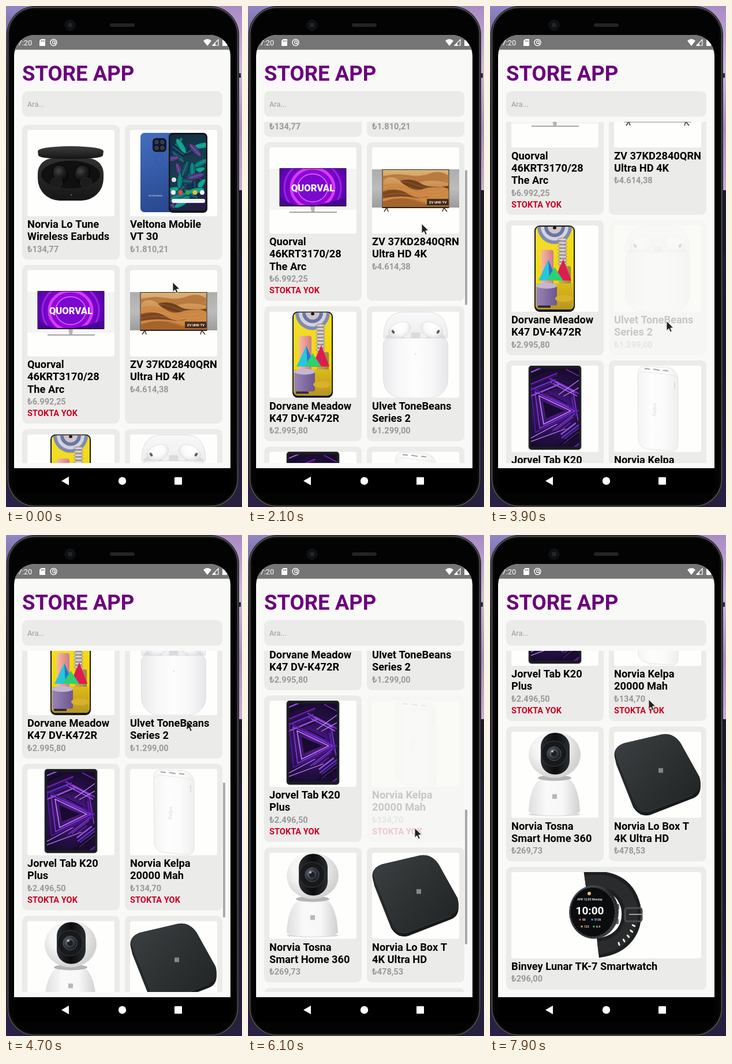
Animation, 409 px wide and 865 px high, one loop 8 s. Source, as an HTML page with a canvas:

```html
<!DOCTYPE html>
<html lang="tr">
<head>
<meta charset="utf-8">
<title>Store App</title>
<style>
html, body { margin: 0; width: 100%; height: 100%; overflow: hidden; background: #000; }
canvas { display: block; width: 409px; height: 865px; }
</style>
</head>
<body>
<canvas id="stage" width="409" height="865"></canvas>
<script>
const ctx = document.getElementById('stage').getContext('2d');
const LOOP = 8000, STEP = 100;
const PAGE = '#f9f9f7', CARD = '#ebebea', TAU = Math.PI * 2;
const FONT = 'Roboto, "Open Sans", sans-serif';
const VIEW = { top: 200, bottom: 789, content: 1493.5 };

// Motion: rows of [time, value, ...]
const SCROLL = [[1500, 0], [1600, 14], [1800, 85], [2100, 212], [2300, 262], [2500, 300], [2700, 330],
  [2900, 348.5], [3100, 357], [3300, 360.5], [3900, 360.5], [4000, 372], [4300, 450], [4700, 577.5],
  [4900, 642], [5100, 677], [6000, 677], [6100, 695.5], [6500, 818], [6700, 876], [6900, 904.5]];
const POINTER = [[100, 289, 477], [200, 266, 516], [300, 242, 557], [400, 242, 557], [800, 284, 601],
  [1500, 284, 601], [1600, 286, 577], [1800, 293, 503], [2100, 301, 376], [2500, 304, 290], [2900, 305, 249],
  [3400, 305, 249], [3800, 306, 544], [3900, 306, 544], [4300, 310, 445], [4700, 313, 320], [5100, 318, 243],
  [5200, 318, 243], [5700, 293, 308], [5800, 293, 308], [5900, 290, 517], [6000, 290, 517], [6100, 289, 506],
  [6500, 297, 384], [6900, 304, 240], [7200, 300, 225], [7700, 300, 225], [7900, 275, 284]];
const BAR = [[1500, 0], [1600, 1], [3400, 1], [3700, 0], [3900, 0], [4000, 1], [5200, 1], [5500, 0],
  [6000, 0], [6100, 1], [7000, 1], [7300, 0]];

function track(rows, t, col = 1) {
  if (t <= rows[0][0]) return rows[0][col];
  for (let i = 1; i < rows.length; i++) {
    const a = rows[i - 1], b = rows[i];
    if (t <= b[0]) return a[col] + (b[col] - a[col]) * (t - a[0]) / (b[0] - a[0]);
  }
  return rows[rows.length - 1][col];
}

function seeded(seed) {
  return () => (seed = (seed * 16807) % 2147483647) / 2147483647;
}

function grad(x0, y0, x1, y1, ...colors) {
  const g = ctx.createLinearGradient(x0, y0, x1, y1);
  colors.forEach((c, i) => g.addColorStop(i / (colors.length - 1), c));
  return g;
}
function glow(x, y, r, ...colors) {
  const g = ctx.createRadialGradient(x, y, 0, x, y, r);
  colors.forEach((c, i) => g.addColorStop(i / (colors.length - 1), c));
  return g;
}
function paint(fill, stroke, width = 1) {
  if (fill) { ctx.fillStyle = fill; ctx.fill(); }
  if (stroke) { ctx.strokeStyle = stroke; ctx.lineWidth = width; ctx.stroke(); }
}
function box(x, y, w, h, r, fill, stroke, width) {
  ctx.beginPath();
  ctx.roundRect(x, y, w, h, r);
  paint(fill, stroke, width);
}
function oval(x, y, rx, ry, fill, stroke, width, turn = 0) {
  ctx.beginPath();
  ctx.ellipse(x, y, rx, ry, turn, 0, TAU);
  paint(fill, stroke, width);
}
function poly(points, fill, stroke, width) {
  ctx.beginPath();
  points.forEach(([x, y], i) => i ? ctx.lineTo(x, y) : ctx.moveTo(x, y));
  ctx.closePath();
  paint(fill, stroke, width);
}
function path(d, fill, stroke, width = 1) {
  const p = new Path2D(d);
  if (fill) { ctx.fillStyle = fill; ctx.fill(p); }
  if (stroke) { ctx.strokeStyle = stroke; ctx.lineWidth = width; ctx.stroke(p); }
}
function text(s, x, y, size, color, weight = 'bold', align = 'left') {
  ctx.font = `${weight} ${size}px ${FONT}`;
  ctx.fillStyle = color;
  ctx.textAlign = align;
  ctx.fillText(s, x, y);
}
function clipped(x, y, w, h, r, draw) {
  ctx.save();
  ctx.beginPath();
  ctx.roundRect(x, y, w, h, r);
  ctx.clip();
  draw();
  ctx.restore();
}

// Product pictures, drawn in a 151 x 149 box
function earbuds() {
  box(18, 49, 114, 73, [26, 26, 38, 38], grad(0, 49, 0, 122, '#303030', '#242424', '#161616'));
  oval(75, 77, 51, 24, '#101010');
  for (const [x, lean] of [[57, -0.3], [95, 0.3]]) {
    oval(x, 76, 13, 16, glow(x - 3, 71, 17, '#444', '#222', '#0c0c0c'), '#000', 1, lean);
    oval(x + lean * 22, 91, 10, 9, '#1c1c1c', '#333', 0.7);
  }
  oval(76, 112, 1.2, 1, '#777');
  path('M18 37Q18 29 75 28Q132 29 132 37L131 44Q128 50 75 50Q22 50 19 44Z',
    grad(0, 28, 0, 50, '#3c3c3c', '#2a2a2a', '#141414'));
}

function bluePhone() {
  box(18, 5, 62, 137, 7, grad(18, 0, 72, 140, '#446fbe', '#365ba9', '#29468b'));
  box(39, 14, 24, 24, 6, '#15182a');
  [[46, 21], [56, 21], [46, 31], [56, 31]].forEach(([x, y]) => oval(x, y, 3, 3, '#303747', '#53607c', 0.7));
  oval(51, 51, 7, 8, null, '#30529d');
  text('VELTONA MOBILE', 44, 115, 3, '#a5b8dd', 'bold', 'center');
  box(67, 5, 67, 138, 7, '#12151c');
  clipped(69.5, 8, 62, 131, 5, () => {
    ctx.fillStyle = grad(68, 0, 134, 130, '#112c3d', '#183e50', '#251c45');
    ctx.fillRect(67, 5, 67, 138);
    const rnd = seeded(91);
    for (let i = 0; i < 32; i++) {
      const x = 70 + rnd() * 62, y = 18 + rnd() * 110, a = rnd() * 3;
      oval(x, y, 15, 5, ['#087b78', '#0fa08e', '#154e62', '#5b3685', '#14314d'][i % 5], '#0c2535', 0.7, a);
      ctx.save();
      ctx.translate(x, y); ctx.rotate(a);
      ctx.fillStyle = '#44b1a0'; ctx.fillRect(-12, 0, 24, 0.6);
      ctx.restore();
    }
    ['#f5f5f5', '#e84b3c', '#2dac58', '#f3ba2a', '#f5f5f5'].forEach((c, i) => oval(75 + i * 12.5, 108, 4, 4, c));
    box(72, 119, 58, 7, 3, '#f5f5f5');
    oval(76, 86, 4, 4, '#d5e4e3');
  });
}

function ringsTv() {
  ctx.fillStyle = '#f4f5f2'; ctx.fillRect(0, 37, 151, 71);
  box(17.5, 36, 116, 66, 1, '#2a1238');
  clipped(18.5, 37, 114, 63, 0, () => {
    ctx.fillStyle = glow(75, 70, 66, '#b412ee', '#a30ce6', '#8806d8', '#6a04bd', '#4f039c');
    ctx.fillRect(18, 36, 116, 66);
    oval(75, 70, 37, 34, null, '#d63cf5', 5);
    oval(75, 70, 26, 24, '#7a08cf', '#e36bf7', 1.5);
    oval(75, 70, 49, 46, null, '#9a23e8', 3);
    path('M18 86Q46 106 75 101T134 86V104H18Z', '#4a0494');
  });
  text('QUORVAL', 75.5, 76, 16.6, '#fff', 900, 'center');
  poly([[71, 102], [79, 102], [78, 111], [73, 111]], '#b3b3b3');
  ctx.fillStyle = '#a2a2a2'; ctx.fillRect(35, 111, 82, 2);
}

function dunesTv() {
  ctx.fillStyle = grad(0, 38, 0, 104, '#adadad', '#bcbcbc', '#9c9c9c');
  ctx.fillRect(0, 38, 151, 66);
  ctx.fillStyle = '#292321'; ctx.fillRect(17.5, 38, 116, 67);
  clipped(18.5, 39, 114, 64, 0, () => {
    ctx.fillStyle = grad(0, 39, 0, 103, '#dcb277', '#c98a49', '#96592a');
    ctx.fillRect(18, 38, 116, 66);
    path('M18 50Q42 44 62 48T100 45T134 50V62Q104 54 84 60T46 56T18 60Z', '#b87a3f');
    path('M48 58Q70 52 84 62T134 66V72Q106 66 88 72T48 58Z', '#6f3f1c');
    path('M18 66Q44 58 64 70T106 72T134 78V104H18Z', '#cc8744');
    path('M18 76Q42 68 62 80T100 84L80 88Q52 82 18 88Z', '#7c4620');
    path('M18 94Q52 82 82 93T134 90V104H18Z', '#a5642d');
    for (let i = 0; i < 6; i++)
      path(`M18 ${56 + i * 7}Q48 ${46 + i * 7} 76 ${58 + i * 7}T134 ${55 + i * 7}`, null, '#e4a75d77', 0.7);
    ctx.fillStyle = '#28190fcc'; ctx.fillRect(95, 89, 38, 11);
  });
  text('ZV UHD TV', 114, 97, 6, '#fff', 'bold', 'center');
  path('M25 105L21 111M26 105L28 111M125 105L130 111M124 105L122 111', null, '#292929', 1.4);
}

function yellowPhone() {
  box(40, 0, 70, 149, 9, '#17181c');
  clipped(42, 2, 66, 143, 7, () => {
    ctx.fillStyle = grad(42, 0, 108, 145, '#f2df37', '#f3d90f', '#ecc90c');
    ctx.fillRect(40, 0, 70, 149);
    [[30, '#7f8bb0'], [24, '#d3d3dc'], [18, '#6a75a3'], [12, '#d0c4cc']].forEach(([r, c]) => oval(75, 2, r, r, c));
    box(83, 21, 12, 50, 2, '#a89e9c');
    for (let i = 0; i < 8; i++) oval(88.5, 24 + i * 6, 8, 2.2, '#ddd3d2', '#857a85', 0.8);
    box(51, 42, 22, 64, 4, grad(51, 0, 73, 0, '#f4bda0', '#ea9a92', '#cc7c8e'));
    box(82, 70, 21, 40, 3, grad(82, 0, 103, 0, '#c9b44a', '#98834a'));
    box(43, 100, 64, 46, 0, grad(0, 100, 0, 146, '#dcbc15', '#b69424'));
    box(43, 104, 36, 34, 3, grad(43, 0, 79, 0, '#9985b4', '#6c5790'));
    oval(61, 104, 18, 5, '#c6b6d2');
    oval(91, 126, 15, 6, '#d8b22a');
    poly([[64, 59], [47, 95], [78, 95]], '#28c6dd');
    poly([[64, 59], [66, 95], [79, 95]], '#2477c4');
    poly([[90, 58], [74, 95], [104, 95]], '#dd1c50');
    poly([[75, 72], [61, 95], [90, 95]], '#2fd070');
    box(46, 138, 22, 4, 1, '#342c3c');
  });
  oval(75, 4, 3, 2.5, '#111');
}

function budsCase() {
  path('M20 45Q20 3 52 1H99Q131 3 131 45Q119 53 75 52Q32 53 20 45Z',
    grad(0, 0, 0, 50, '#f9f9fa', '#ececee'), '#dcdcdf');
  oval(75.5, 44, 52, 8, '#dadbde');
  for (const side of [-1, 1]) {
    const x = 75.5 + side * 28;
    box(x - side * 14 - 6, 26, 12, 26, 5, '#f0f0f1');
    oval(x, 32, 20, 13, glow(x, 26, 24, '#fff', '#fafafa', '#dadbdd'), '#d3d4d6', 0.7, side * 0.45);
    oval(x + side * 11, 35, 2.2, 3.5, '#5d6165', null, 1, side * 0.6);
  }
  box(19.5, 46, 112, 103, [10, 10, 31, 31],
    grad(19, 0, 132, 0, '#e9e9eb', '#f8f8f9', '#fdfdfd', '#f7f7f8', '#e6e6e9'), '#dfdfe1');
  oval(75.5, 73, 1.5, 1.5, '#dfe2de');
}

function tablet() {
  box(30, 0, 91, 145, 5, '#1b1b22', '#4b4b52', 0.7);
  clipped(34, 5, 83, 135, 1, () => {
    ctx.fillStyle = glow(73, 75, 76, '#55218e', '#2b1152', '#150a28');
    ctx.fillRect(30, 0, 91, 145);
    const rnd = seeded(27);
    for (let i = 0; i < 46; i++) {
      const a = [0.48, -0.65, 1.4, 2.75][i % 4], d = 16 + rnd() * 66, len = 14 + rnd() * 48;
      ctx.save();
      ctx.translate(73, 75); ctx.rotate(a);
      ctx.fillStyle = ['#6530c4', '#9a52dd', '#441485', '#7a25bb', '#110b20'][i % 5];
      ctx.fillRect(-len / 2, d * (i % 2 ? 1 : -1), len, 0.7 + rnd() * 2);
      ctx.restore();
    }
    [0, 7, 14].forEach(k => poly([[48 - k, 52 - k], [103 + k, 78], [56 - k, 101 + k]],
      null, ['#c77aff', '#8a36e3', '#531ba5'][k / 7], 1.6));
    poly([[55, 62], [92, 78], [60, 91]], '#190a31');
    path('M34 125L79 101M34 131L94 109M82 50L117 25M90 53L117 38', null, '#c886ff', 1.3);
  });
}

function powerBank() {
  path('M41 14Q41 2 52 1L92 3Q100 4 105 9L109 15Q111 18 111 24V136Q111 148 99 148L58 144Q46 142 42 130Z',
    grad(41, 0, 111, 0, '#f4f4f3', '#fdfdfd', '#fbfbfb', '#efefee'), '#e3e3e2');
  path('M42 15Q46 10 56 11L98 16Q106 17 110 22', null, '#e8e8e7');
  path('M53 5L62 6M68 6L79 8M85 8L94 9', null, '#a5a5a5', 2);
  path('M105 28V40', null, '#dcdcdc', 2);
  ctx.save();
  ctx.translate(73, 87); ctx.rotate(-Math.PI / 2);
  text('Kelpa', 0, 0, 9, '#dededc', 'normal');
  ctx.restore();
}

function camera() {
  oval(75, 143, 45, 3, '#d8d8d8');
  path('M30 137Q32 99 47 84Q75 74 103 84Q117 99 119 137Q117 145 75 145Q32 145 30 137Z',
    grad(30, 0, 119, 0, '#dedede', '#f9f9f9', '#f7f7f7', '#d0d0d0'));
  oval(75, 80, 29, 5, '#b4b4b4');
  oval(75, 40, 45, 40, glow(66, 28, 53, '#fff', '#f4f4f4', '#d2d2d2'));
  box(51, 2, 50, 72, 24, grad(51, 0, 101, 0, '#2a2c2f', '#0a0b0c', '#2b2e31'));
  oval(74, 38, 22, 22, '#17191b', '#3a3d41', 1);
  oval(74, 38, 12, 12, glow(72, 36, 13, '#8a949c', '#434c53', '#1a1d20'), '#5d6369');
  oval(74, 38, 5, 5, '#1b2024');
  oval(71, 34, 2, 2, '#b8c0c8');
  box(71, 108, 8, 8, 0, '#b6b6b6');
}

function tvBox() {
  path('M1 44Q-2 27 17 20L82 5Q103 1 116 21L148 80Q155 108 137 115L62 144Q44 148 33 130L4 57Z', '#17191a');
  path('M2 40Q0 26 18 20L82 5Q103 1 116 21L148 78Q155 100 137 108L62 137Q44 141 35 124L5 50Z',
    grad(10, 15, 140, 125, '#3b3e40', '#2e3132', '#222526'));
  path('M3 49L33 125Q42 141 60 138L137 109', null, '#404345');
  box(77, 63, 8, 8, 0, '#84888a');
}

function watch() {
  const band = 'M128 17C170 11 198 24 207 60C213 96 194 126 150 131';
  path(band, null, '#1d1e1f', 34);
  path(band, null, '#2a2b2c', 22);
  // Strap holes follow the lower bend
  for (let i = 0; i < 5; i++) {
    const a = 0.28 + i * 0.2;
    oval(162 + 52 * Math.cos(a), 78 + 52 * Math.sin(a), 3.6, 1.6, '#e9e9e7', null, 1, a + 0.2);
  }
  box(197, 62, 29, 23, 4, null, '#4a4d4f', 3);
  path('M204 73H227', null, '#9fa1a3', 2);
  box(182, 55, 5, 10, 2, '#656769');
  box(181, 80, 5, 10, 2, '#656769');
  oval(143, 69, 43, 46, grad(100, 24, 186, 115, '#636669', '#222426', '#48494b'));
  oval(141, 69, 39, 43, '#0b0c0d', '#313437', 1.5);
  for (let i = 0; i < 48; i++) {
    const a = i / 48 * TAU;
    ctx.beginPath();
    ctx.moveTo(141 + 38 * Math.cos(a), 69 + 42 * Math.sin(a));
    ctx.lineTo(141 + 40 * Math.cos(a), 69 + 44 * Math.sin(a));
    paint(null, '#777', 0.6);
  }
  oval(135, 37, 3, 3, '#e4bf6d');
  text('APR 12/05 Monday', 136, 49, 5, '#ddd', 'bold', 'center');
  text('10:00', 136, 73, 19, '#fff', 'bold', 'center');
  [['#e34b3f', 119, 82], ['#3da4d8', 140, 82], ['#e49c39', 122, 94], ['#3bb864', 143, 94]].forEach(([c, x, y], i) => {
    oval(x, y, 1.8, 1.8, c);
    text(['80', '5136', '123', '6.4'][i], x + 4, y + 2, 5, '#ddd');
  });
}

const products = [
  { row: 0, side: 0, name: ['Norvia Lo Tune', 'Wireless Earbuds'], price: '134,77', art: earbuds },
  { row: 0, side: 1, name: ['Veltona Mobile', 'VT 30'], price: '1.810,21', art: bluePhone },
  { row: 1, side: 0, name: ['Quorval', '46KRT3170/28', 'The Arc'], price: '6.992,25', art: ringsTv, out: true },
  { row: 1, side: 1, name: ['ZV 37KD2840QRN', 'Ultra HD 4K'], price: '4.614,38', art: dunesTv,
    press: [[1200, 0], [1300, 0.5], [1400, 0.8], [1600, 0.8], [1800, 0]] },
  { row: 2, side: 0, name: ['Dorvane Meadow', 'K47 DV-K472R'], price: '2.995,80', art: yellowPhone },
  { row: 2, side: 1, name: ['Ulvet ToneBeans', 'Series 2'], price: '1.299,00', art: budsCase,
    press: [[3700, 0], [3800, 0.5], [3900, 0.8], [4000, 0.8], [4200, 0]] },
  { row: 3, side: 0, name: ['Jorvel Tab K20', 'Plus'], price: '2.496,50', art: tablet, out: true },
  { row: 3, side: 1, name: ['Norvia Kelpa', '20000 Mah'], price: '134,70', art: powerBank, out: true,
    press: [[6000, 0], [6100, 0.8], [6200, 0.8], [6400, 0]] },
  { row: 4, side: 0, name: ['Norvia Tosna', 'Smart Home 360'], price: '269,73', art: camera },
  { row: 4, side: 1, name: ['Norvia Lo Box T', '4K Ultra HD'], price: '478,53', art: tvBox },
  { row: 5, side: 0, wide: true, name: ['Binvey Lunar TK-7 Smartwatch'], price: '296,00', art: watch }
];
const rowTop = [205, 447, 730.5, 972.5, 1235, 1477.5];
const rowHeight = [233, 274, 233, 253, 233, 212];

function drawCard(p, t, scroll) {
  const y = rowTop[p.row] - scroll, h = rowHeight[p.row];
  if (y > VIEW.bottom || y + h < VIEW.top) return;
  const x = p.side ? 206 : 28, w = p.wide ? 347 : 169;
  box(x, y, w, h, 9, CARD);
  clipped(x + 9, y + 9, w - 18, 149, 4, () => {
    ctx.translate(x + 9, y + 9);
    ctx.fillStyle = '#fefefd'; ctx.fillRect(0, 0, w, 149);
    p.art();
  });
  p.name.forEach((line, i) => text(line, x + 9, y + 178 + i * 21.4, 18.25, '#000'));
  const base = y + 177 + p.name.length * 21.4;
  text('₺' + p.price, x + 9, base, 14.6, '#999');
  if (p.out) text('STOKTA YOK', x + 9, base + 20, 14.6, '#cb0020');
  const veil = p.press ? track(p.press, t) : 0;
  if (veil) {
    ctx.globalAlpha = veil;
    box(x - 0.5, y - 0.5, w + 1, h + 1, 9, PAGE);
    ctx.globalAlpha = 1;
  }
}

function drawDevice() {
  ctx.fillStyle = grad(0, 0, 0, 865, '#9387c4', '#2c2740', '#211e30', '#1d1a2b', '#211c38', '#2b2148');
  ctx.fillRect(0, 0, 205, 865);
  ctx.fillStyle = grad(0, 0, 0, 318, '#a98bc4', '#cdb8d8', '#a78fb8', '#c8abd0');
  ctx.fillRect(205, 0, 204, 318);
  ctx.fillStyle = grad(0, 318, 0, 865, '#211d3a', '#1b1930', '#272040');
  ctx.fillRect(205, 318, 204, 547);
  box(404, 116, 3, 8, 1, '#24222b');
  box(403, 318, 4, 108, 1, '#191820');
  box(1, 0, 403, 866, 50, '#262627');
  box(3.5, 2.5, 398, 861, 47, '#0c0c0c', '#58585a', 1.4);
  box(7, 6, 391, 854, 43, '#030303');
  oval(111, 33, 9, 9, '#0e1012', '#181a1d');
  oval(111, 33, 4, 4, '#20262b');
  box(180, 30, 43, 6, 3, '#242424');
}

function drawStatus() {
  ctx.fillStyle = '#757575'; ctx.fillRect(14, 50, 375, 25.5);
  text('7:20', 20.5, 68, 12.8, '#fff', 'normal');
  path('M61 57H68V69H58V60Z', '#fff');
  path('M61.5 59V62M63.7 59V62M65.9 59V62', null, '#757575', 1);
  oval(82.5, 63, 5.5, 5.5, null, '#fff', 1.4);
  oval(83, 62.5, 2.4, 2.4, null, '#fff', 1.2);
  path('M84 64L87 67', null, '#fff', 1.3);
  path('M342 60Q349 54 356 60L349 69Z', '#fff');
  path('M358 68L368 58V68Z', null, '#fff', 1.2);
  path('M358 69L363 64V69Z', '#fff');
  path('M375 58H377V57H381V58H383V69H375Z', '#fff');
}

function drawPage(t) {
  const scroll = track(SCROLL, t);
  clipped(14, 50, 375, 748, [36, 36, 0, 0], () => {
    ctx.fillStyle = PAGE; ctx.fillRect(14, 50, 375, 748);
    drawStatus();
    text('STORE APP', 28, 128.5, 36.5, '#6b007b');
    box(28, 147, 347, 44, 9, CARD);
    text('Ara...', 37, 174, 12.8, '#9a9a99', 'normal');
    clipped(14, VIEW.top, 375, VIEW.bottom - VIEW.top, 0, () => {
      products.forEach(p => drawCard(p, t, scroll));
      const view = VIEW.bottom - VIEW.top, ratio = view / VIEW.content;
      ctx.globalAlpha = track(BAR, t);
      ctx.fillStyle = '#a9a9a9';
      ctx.fillRect(376, VIEW.top + scroll * ratio, 4, view * ratio);
      ctx.globalAlpha = 1;
    });
  });
  ctx.fillStyle = '#000'; ctx.fillRect(14, 798, 375, 43);
  poly([[96, 820], [109, 812.5], [109, 827.5]], '#fff');
  oval(201.5, 820, 6.7, 6.7, '#fff');
  box(292, 813.5, 13, 13, 1, '#fff');
}

function drawPointer(t) {
  ctx.save();
  ctx.translate(track(POINTER, t, 1), track(POINTER, t, 2));
  poly([[0, 0], [0, 16.5], [3.9, 13], [6.5, 19], [9.2, 17.8], [6.7, 12], [11.8, 11.6]], '#222', '#e8e8e8', 1);
  ctx.restore();
}

let shown = -1;
function frame(now) {
  const t = Math.floor(((now - start) % LOOP) / STEP) * STEP;
  if (t !== shown && t >= 0) {
    shown = t;
    drawDevice();
    drawPage(t);
    drawPointer(t);
  }
  requestAnimationFrame(frame);
}
const start = performance.now();
frame(start);
</script>
</body>
</html>
```
